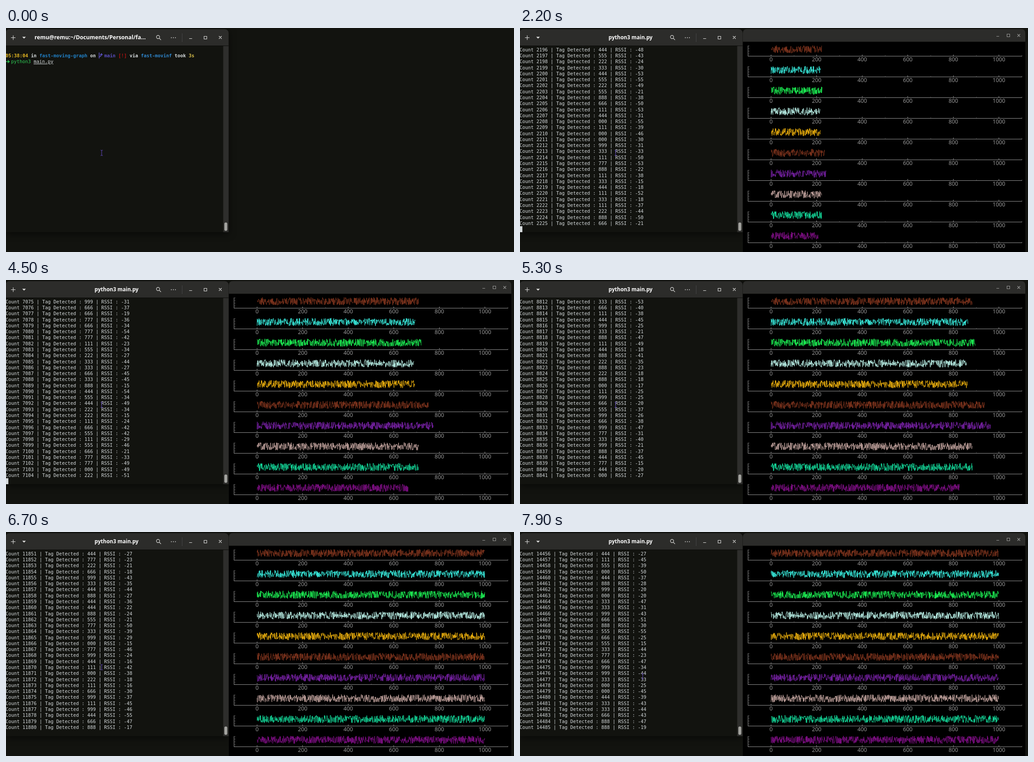
These frames come from a looping animation (1126 by 497 pixels, 8 s). An HTML page:

```html
<!DOCTYPE html>
<html lang="en">
<head>
<meta charset="utf-8">
<title>Live tag graph</title>
<style>
  html, body { margin: 0; width: 100%; height: 100%; overflow: hidden; background: #12130f; }
  svg { display: block; width: 1126px; height: 497px; }
  text { white-space: pre; }
  .mono { font: 10.38px "DejaVu Sans Mono", monospace; fill: #d6dbdd; }
  .bold { font-weight: bold; }
  .title { font: bold 12.2px "Noto Sans", "Open Sans", sans-serif; fill: #fff; text-anchor: middle; }
  .label { font: 12.3px "Noto Sans", sans-serif; fill: #969696; text-anchor: middle; }
  .icon { fill: none; stroke: #e4e4e2; stroke-width: 1.1; }
  .dim { stroke: #989896; }
  .axis { fill: none; stroke: #969696; shape-rendering: crispEdges; }
  .minor { opacity: .4; }
  .wave { fill: none; stroke-width: .95; stroke-linejoin: bevel; }
  #terminal { filter: drop-shadow(0 3px 8px rgba(0, 0, 0, .6)); }
</style>
</head>
<body>
<svg viewBox="0 0 1126 497">
  <g id="terminal">
    <path fill="#12130f" d="M-1 38H493.5V453H-1Z"/>
    <path fill="#2c2c2a" d="M-1 39.5V12Q-1 2.5 9 2.5H483.5Q493.5 2.5 493.5 12V39.5Z"/>
    <path fill="#2e2e2c" d="M481.5 39.5H493.5V453H481.5Z"/>
    <path stroke="#0b0b09" d="M0 39.5H493.5"/>
    <rect x="484" y="431.5" width="6.5" height="18.5" rx="3.2" fill="#a3a39f"/>
  </g>
  <g class="icon">
    <path d="M11 21.5H21M16 16.5V26.5"/>
    <path d="M36 19.5H44L40 23.5Z" fill="#e4e4e2" stroke="none"/>
    <circle cx="337" cy="20" r="3.6"/>
    <path d="M339.6 22.6L343.5 26.5"/>
    <path d="M366.5 21.5h.01M371 21.5h.01M375.5 21.5h.01" stroke-width="1.8" stroke-linecap="round"/>
    <path d="M390.5 12V31" stroke="#454543"/>
    <path d="M406 23.5H412.5M439 18.5H445V24.5H439ZM472 18L478 24M478 18L472 24"/>
  </g>
  <text id="title" class="title" y="25"></text>

  <g id="prompt">
    <text class="mono bold" x="-1" y="65"><tspan fill="#e6b822">05:38:04</tspan> in <tspan fill="#2180c6">fast-moving-graph</tspan> on   <tspan fill="#5a4fc0">main</tspan> <tspan fill="#b31212">[!]</tspan> via <tspan fill="#2f86cc">fast-movinf</tspan> took <tspan fill="#d6bd4a">3s</tspan></text>
    <path d="M206.5 54.5V67.5M206.5 64Q211.5 63 211.5 58M209 60L211.5 57L214 60" fill="none" stroke="#5a4fc0" stroke-width="1.6"/>
    <path d="M0 74.5H7M4 71.5L7.3 74.5L4 77.5" fill="none" stroke="#2ecc55" stroke-width="1.5"/>
    <text class="mono" x="11.2" y="78.3"><tspan fill="#2ecc55">python3</tspan> <tspan text-decoration="underline">main.py</tspan></text>
  </g>
  <g id="log"></g>
  <rect id="cursor" width="6.25" height="13.3" fill="#d6dbdd"/>

  <g id="plots">
    <path fill="#000" d="M494 30H1120V497H494Z"/>
    <path fill="#2c2c2a" d="M494 30.5V11Q494 2.5 503 2.5H1111Q1120 2.5 1120 11V30.5Z"/>
    <path class="icon dim" d="M1056 18.5H1062M1079.5 13.5H1085.5V19.5H1079.5ZM1102.5 13.5L1108.5 19.5M1108.5 13.5L1102.5 19.5"/>
  </g>
  <path id="pointer" d="M-2.5 -6Q0 -6 0 -4.5Q0 -6 2.5 -6M0 -4.5V4.5M-2.5 6Q0 6 0 4.5Q0 6 2.5 6" fill="none" stroke="#5b45b0" stroke-width="1.1"/>
</svg>
<script>
const LOOP = 8000, STEP = 100, BLINK = 600;
const TYPED = 500, ENTER = 900, RENAMED = 1000, RUNNING = 1300;
const ROWS = 30, LINE = 13.28, LEFT = -1, CHAR = 6.25;
const SPAN = 1000, PITCH = 46, BAND = 17.2;

// Colour of each series and its speed relative to the average one.
const SERIES = [
  ['#83361f', 1], ['#3cf5e6', 0.98], ['#1ef556', 1.015], ['#bff7ee', 0.97], ['#f5b70f', 0.975],
  ['#83361f', 1.06], ['#7a22a8', 1.09], ['#c9a9a4', 1], ['#16e0a0', 1], ['#85108c', 0.935],
];

// The printing speed varies a little: [time, lines printed].
const COUNTS = [[1300, 40], [2200, 2225], [3600, 4918], [4500, 7104], [7900, 14485]];
const POINTER = [[5900, 212, 277], [6700, 212, 300], [7900, 272, 320]];

const $ = id => document.getElementById(id);

function add(parent, tag, attrs, text = '') {
  const node = document.createElementNS(parent.namespaceURI, tag);
  for (const [key, value] of Object.entries(attrs)) node.setAttribute(key, value);
  node.textContent = text;
  return parent.appendChild(node);
}

// Linear interpolation between key points, held at both ends.
function lookup(points, time, column = 1) {
  const next = points.findIndex(point => point[0] > time);
  if (next === 0) return points[0][column];
  if (next < 0) return points[points.length - 1][column];
  const a = points[next - 1], b = points[next];
  return a[column] + (b[column] - a[column]) * (time - a[0]) / (b[0] - a[0]);
}

function random(a, b) {
  let h = Math.imul(a + 1, 0x9e3779b1) ^ Math.imul(b + 7, 0x85ebca6b);
  h = Math.imul(h ^ h >>> 15, 0x2c1b3c6d);
  h = Math.imul(h ^ h >>> 12, 0x297a2d39);
  return ((h ^ h >>> 15) >>> 0) / 2 ** 32;
}

function logLine(n) {
  const tag = String(Math.floor(random(n, 50) * 10)).repeat(3);
  const rssi = -15 - Math.floor(random(n, 60) * 41);
  return `Count ${n} | Tag Detected : ${tag} | RSSI : ${rssi}`;
}

const plotX = value => 556.5 + value * 0.505;

function makePlot([color, speed], k) {
  const base = 62.5 + k * PITCH, plots = $('plots');
  const ticks = (from, size) => Array.from({ length: 6 }, (_, i) =>
    `M${plotX(from + i * 200)} ${base}v${-size}`).join('');
  const sideTicks = Array.from({ length: 4 }, (_, i) => `M506 ${base - 5 - i * 6}h3`).join('');
  add(plots, 'path', { class: 'axis', d: `M505.5 ${base - 24}V${base}H1112.5${ticks(0, 4)}` });
  add(plots, 'path', { class: 'axis minor', d: ticks(100, 3) + sideTicks });
  for (let v = 0; v <= SPAN; v += 200)
    add(plots, 'text', { class: 'label', x: plotX(v), y: base + 11.6 }, v);

  // Readings sometimes hold for a few samples.
  const heights = [];
  for (let i = 0; i < 1700; i++) {
    const held = i && random(i, k + 20) < 0.22;
    heights.push(held ? heights[i - 1] : base - 24 + random(i, k) * BAND);
  }
  return { heights, speed, line: add(plots, 'polyline', { class: 'wave', stroke: color }) };
}

const rows = Array.from({ length: ROWS }, (_, i) =>
  add($('log'), 'text', { class: 'mono', x: LEFT, y: 51.7 + i * LINE }));
const plots = SERIES.map(makePlot);

function show(id, visible) {
  $(id).style.display = visible ? '' : 'none';
}

function drawTitle(t) {
  const renamed = t >= RENAMED, title = $('title');
  title.textContent = renamed ? 'python3 main.py' : 'remu@remu:~/Documents/Personal/fa...';
  title.setAttribute('x', renamed ? 245 : 186.5);
  title.style.fontSize = renamed ? '11.6px' : '';
}

function drawCursor(t) {
  const row = t < ENTER ? 2 : t < RUNNING ? 3 : ROWS;
  $('cursor').setAttribute('x', LEFT + (t < ENTER ? 17 * CHAR : 0));
  $('cursor').setAttribute('y', 41.3 + row * LINE);
  show('cursor', t < ENTER ? t >= TYPED : (t - ENTER) % (2 * BLINK) < BLINK);
}

function drawPlots(count) {
  for (const { heights, speed, line } of plots) {
    const end = Math.round(count / plots.length * speed);
    const visible = heights.slice(Math.max(0, end - SPAN), end);
    line.setAttribute('points', visible
      .map((y, i) => `${plotX(i).toFixed(2)},${y.toFixed(2)}`).join(' '));
  }
}

function draw(t) {
  const running = t >= RUNNING;
  drawTitle(t);
  drawCursor(t);
  show('prompt', !running);
  show('log', running);
  show('plots', running);
  $('pointer').setAttribute('transform', `translate(${lookup(POINTER, t)} ${lookup(POINTER, t, 2)})`);
  if (!running) return;
  const count = Math.round(lookup(COUNTS, t));
  rows.forEach((row, i) => { row.textContent = logLine(count - ROWS + 1 + i); });
  drawPlots(count);
}

const began = performance.now();
let shown = -1;

function tick() {
  const t = Math.floor((performance.now() - began) % LOOP / STEP) * STEP;
  if (t !== shown) draw(shown = t);
  requestAnimationFrame(tick);
}
tick();
</script>
</body>
</html>
```
